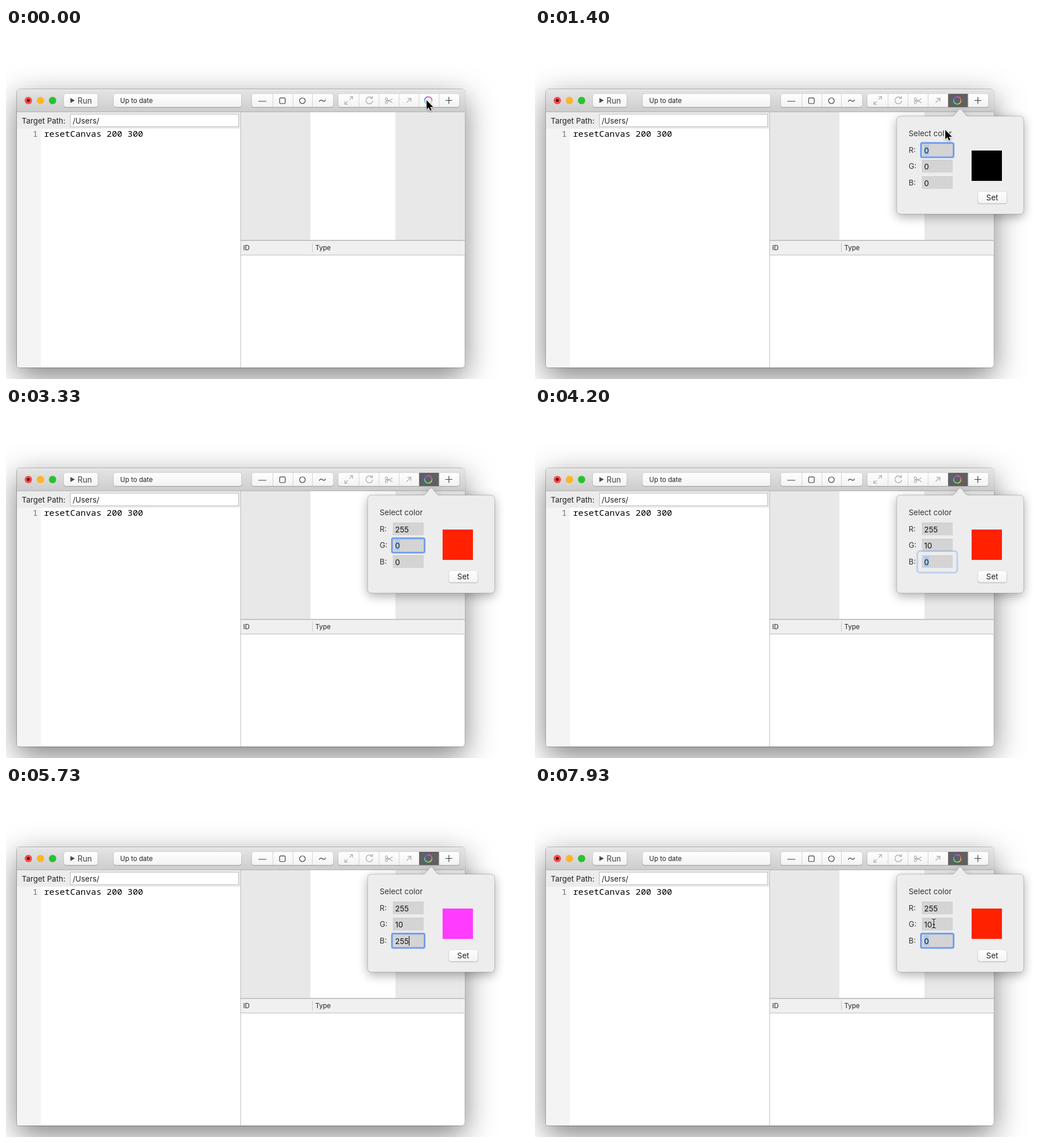
Write an HTML page with a canvas that moves like this. It is 914 px wide and 613 px high and loops after 8 s.

```html
<!DOCTYPE html>
<html lang="en">
<head>
<meta charset="utf-8">
<title>Color picker</title>
<style>
html, body { margin: 0; width: 100%; height: 100%; overflow: hidden; background: #fff; }
canvas { display: block; }
</style>
</head>
<body>
<canvas id="stage" width="914" height="613"></canvas>
<script>
const W = 914, H = 613, LOOP = 8000, FPS = 15;
const SANS = 'Inter, "Liberation Sans", sans-serif';
const MONO = '"Noto Sans Mono", "DejaVu Sans Mono", monospace';
const stage = document.getElementById('stage').getContext('2d');

function makeLayer() {
  const c = document.createElement('canvas');
  c.width = W;
  c.height = H;
  return c.getContext('2d');
}
const base = makeLayer(), layer = makeLayer();

// Shared drawing helpers
function rect(g, x, y, w, h, fill) {
  g.fillStyle = fill;
  g.fillRect(x, y, w, h);
}
function round(g, x, y, w, h, r, fill, stroke, width = 1) {
  g.beginPath();
  g.roundRect(x, y, w, h, r);
  if (fill) { g.fillStyle = fill; g.fill(); }
  if (stroke) { g.strokeStyle = stroke; g.lineWidth = width; g.stroke(); }
}
function disc(g, x, y, r, fill) {
  g.beginPath();
  g.arc(x, y, r, 0, Math.PI * 2);
  g.fillStyle = fill;
  g.fill();
}
function text(g, str, x, y, size, color = '#222', family = SANS, align = 'left') {
  g.font = `${size}px ${family}`;
  g.fillStyle = color;
  g.textAlign = align;
  g.fillText(str, x, y);
}
function line(g, d, color, width = 1.1) {
  g.strokeStyle = color;
  g.lineWidth = width;
  g.stroke(new Path2D(d));
}
function shadow(g, color, blur, dy) {
  g.shadowColor = color;
  g.shadowBlur = blur;
  g.shadowOffsetY = dy;
}
function button(g, x, y, w, h) {
  const fill = g.createLinearGradient(0, y, 0, y + h);
  fill.addColorStop(0, '#fefefe');
  fill.addColorStop(1, '#f3f3f3');
  g.save();
  shadow(g, 'rgba(0,0,0,.28)', 1.5, 0.8);
  round(g, x, y, w, h, 4, fill);
  g.restore();
  round(g, x, y, w, h, 4, null, 'rgba(0,0,0,.1)', 0.6);
}
function colorRing(g) {
  const hue = g.createConicGradient(0, 738, 126.5);
  for (let i = 0; i <= 12; i++) hue.addColorStop(i / 12, `hsl(${i * 30 + 20},75%,62%)`);
  g.beginPath();
  g.arc(738, 126.5, 6.4, 0, Math.PI * 2);
  g.strokeStyle = hue;
  g.lineWidth = 1.7;
  g.stroke();
}

function drawToolbar(g) {
  const bar = g.createLinearGradient(0, 107, 0, 146);
  bar.addColorStop(0, '#e5e5e5');
  bar.addColorStop(1, '#cdcdcd');
  rect(g, 19, 107, 783, 39, bar);
  rect(g, 19, 107, 783, 1, '#efefef');
  rect(g, 19, 146, 783, 1, '#b1b1b1');

  ['#fc4a46', '#fdb42a', '#28c231'].forEach((c, i) => disc(g, 39 + i * 21.2, 126.6, 6.4, c));
  disc(g, 39, 126.6, 2.5, '#4c0505');

  button(g, 101, 115, 59.5, 23);
  button(g, 188, 115, 223.5, 23);
  button(g, 429.5, 115, 142.5, 23);
  button(g, 580.5, 115, 212, 23);
  g.fillStyle = '#4a4a4a';
  g.fill(new Path2D('M112.5 122.3L120.3 126.6L112.5 131Z'));
  text(g, 'Run', 125, 131.6, 13.8, '#444');
  text(g, 'Up to date', 199.5, 131, 11.6);
  for (const x of [466, 501, 535, 616.5, 651.5, 686.5, 721.5, 756.5]) rect(g, x, 115, 1, 23, '#d2d2d2');

  const dark = '#3d3d3d', dim = '#a5a5a5';
  line(g, 'M441 128H455', dark);
  round(g, 478.2, 122.2, 9.8, 9.8, 1.8, null, dark, 1.2);
  line(g, 'M523 127A5 5 0 1 1 513 127A5 5 0 1 1 523 127', dark, 1.2);
  line(g, 'M547.3 128.8C549 124.6 551.2 125.6 553 127S557 129 558.6 125.3', dark, 1.2);
  line(g, 'M592.5 132.8L597.4 127.9M600.2 125.2L605.2 120.2M600.5 119.8H605.6V125M592.2 128V133.2H597.4', dim);
  line(g, 'M639.5 122.4A6 6 0 1 0 641 127.2M640.3 118.7V123H636', dim, 1.2);
  line(g, 'M675.5 123.7L666.6 128.7M675.5 130.7L666.6 125.5M666.7 124.3A1.9 1.9 0 1 1 663 124.3A1.9 1.9 0 1 1 666.7 124.3M666.7 129.9A1.9 1.9 0 1 1 663 129.9A1.9 1.9 0 1 1 666.7 129.9', dim);
  line(g, 'M700 130.4L707.3 123.1M701.6 122.8H707.6V128.8', dim, 1.2);
  colorRing(g);
  line(g, 'M768 126.5H780M774 120.5V132.5', dark, 1.2);
}

function drawWindow(g) {
  rect(g, 0, 0, W, H, '#fff');
  g.save();
  shadow(g, 'rgba(0,0,0,.5)', 52, 16);
  round(g, 19, 107, 782.5, 486, 5, '#fff');
  g.restore();
  round(g, 18.5, 106.5, 783.3, 487, 5.5, null, 'rgba(0,0,0,.24)');

  g.save();
  g.beginPath();
  g.roundRect(19, 107, 782.5, 486, 5);
  g.clip();
  rect(g, 19, 107, 783, 487, '#fff');
  drawToolbar(g);

  rect(g, 19, 147, 391, 29, '#ececec');
  text(g, 'Target Path:', 27.5, 167, 13.4);
  rect(g, 112, 150, 295, 23, '#bcbcbc');
  rect(g, 113, 151, 293, 21, '#fff');
  text(g, '/Users/', 116.5, 167, 13.4);
  rect(g, 19, 176, 42, 418, '#f4f4f4');
  text(g, '1', 46.5, 190, 15.2, '#777', MONO);
  text(g, 'resetCanvas 200 300', 66.5, 190, 15.2, '#000', MONO);

  rect(g, 410, 147, 392, 223, '#e8e8e8');
  rect(g, 532, 147, 148.5, 223, '#fff');
  rect(g, 410, 370, 392, 2, '#c4c4c4');
  rect(g, 410, 372, 392, 24, '#f0f0f0');
  rect(g, 410, 396, 392, 1, '#bdbdbd');
  rect(g, 535, 375, 1, 17, '#c9c9c9');
  text(g, 'ID', 414.5, 387.5, 11.6);
  text(g, 'Type', 540.5, 387.5, 11.6);
  rect(g, 409.5, 147, 1, 447, '#b9b9b9');
  g.restore();
}

// Field edits: time, field index, value, whole value selected
const EDITS = [
  [0, 0, '0', true],
  [1870, 0, '2'], [2070, 0, '25'], [2270, 0, '255'],
  [2670, 1, '0', true], [3470, 1, '1'], [3670, 1, '10'],
  [4130, 2, '0', true], [4870, 2, '4'], [5130, 2, '45'], [5400, 2, '255'],
  [6870, 2, '25'], [7000, 2, '2'], [7130, 2, '0', true]
];
const FIELD_Y = [202, 230.5, 259];

function formAt(t) {
  const form = { values: ['0', '0', '0'], focus: 0, since: 0, edited: 0, selected: true };
  for (const [at, field, value, selected] of EDITS) {
    if (at > t + 4) break;
    if (field !== form.focus) form.since = at;
    form.values[field] = value;
    Object.assign(form, { focus: field, edited: at, selected: !!selected });
  }
  return form;
}

// Interpolates rows of [time, ...numbers]
function track(rows, t) {
  const i = rows.findIndex(r => r[0] > t);
  if (i < 0) return rows[rows.length - 1].slice(1);
  if (i === 0) return rows[0].slice(1);
  const a = rows[i - 1], b = rows[i], k = (t - a[0]) / (b[0] - a[0]);
  return a.slice(1).map((v, n) => v + (b[n + 1] - v) * k);
}

function swatchColor(values) {
  const [r, g, b] = values.map(Number);
  return `rgb(${r},${Math.round(Math.max(g, r * 0.13 + b * 0.1))},${b})`;
}

function drawFocus(g, t, form) {
  const y = FIELD_Y[form.focus];
  const k = form.since ? Math.min(1, (t - form.since) / 260) : 1;
  const grow = 12 * (1 - k) ** 2;
  g.globalAlpha = 0.15 + 0.85 * k;
  round(g, 674.5 - grow, y - 1.2 - grow, 57 + grow * 2, 25 + grow * 2, 2.5 + grow / 3, null, '#719eee', 3);
  g.globalAlpha = 1;
}

function drawPopover(g, t) {
  const form = formAt(t);
  const body = new Path2D('M638 154H729C735 154 739 141.5 743 141.5S751 154 757 154H848A6 6 0 0 1 854 160V319A6 6 0 0 1 848 325H638A6 6 0 0 1 632 319V160A6 6 0 0 1 638 154Z');
  g.save();
  shadow(g, 'rgba(0,0,0,.32)', 18, 5);
  g.fillStyle = '#ededed';
  g.fill(body);
  g.restore();
  g.strokeStyle = 'rgba(0,0,0,.22)';
  g.lineWidth = 0.9;
  g.stroke(body);

  text(g, 'Select color', 653, 189, 13.4, '#333');
  FIELD_Y.forEach((y, i) => {
    const value = form.values[i], active = form.focus === i;
    text(g, 'RGB'[i] + ':', 653, y + 15.7, 13.2, '#333');
    rect(g, 676, y, 54, 22, '#d4d4d4');
    rect(g, 676, y, 54, 1, '#c8c8c8');
    g.font = `13.4px ${SANS}`;
    const end = 680 + g.measureText(value).width;
    if (active && form.selected) rect(g, 680, y + 2, end - 680, 18, '#a8c8ef');
    text(g, value, 680, y + 16.7, 13.4, '#111');
    if (active && !form.selected && (t - form.edited) % 1100 < 600) {
      rect(g, end, y + 3, 1, 17, '#000');
    }
  });
  drawFocus(g, t, form);
  rect(g, 763, 214, 53, 53, swatchColor(form.values));
  button(g, 774, 286, 50.5, 20.5);
  text(g, 'Set', 799, 301, 13.4, '#222', SANS, 'center');
}

const OPENING = [
  [900, 0.7, 0.2], [1000, 0.855, 0.6], [1067, 1.02, 0.95],
  [1133, 1.06, 1], [1200, 1.02, 1], [1267, 0.995, 1], [1333, 1, 1]
];

const VISITS = [
  { until: 1866, path: [[0, 735, 126], [1200, 735, 126], [1333, 723, 164], [1400, 717, 178], [1467, 716, 192], [1533, 717, 205], [1600, 717, 211]] },
  { until: 6866, path: [[6200, 717, 211], [6330, 714, 230], [6530, 711, 254]] },
  { until: LOOP, path: [[7266, 711, 254], [7466, 708, 251], [7800, 697, 240]] }
];

function drawCursor(g, t) {
  const visit = VISITS.find(v => t >= v.path[0][0] && t < v.until);
  if (!visit) return;
  const [x, y] = track(visit.path, t);
  const overField = x > 676 && x < 730 && FIELD_Y.some(f => y > f && y < f + 22);
  g.save();
  g.translate(x, y);
  g.lineJoin = 'round';
  if (overField) {
    const beam = 'M-3.5 -8Q0 -8 0 -6V6Q0 8 -3.5 8M3.5 -8Q0 -8 0 -6M0 6Q0 8 3.5 8M-2 1.8H2';
    line(g, beam, 'rgba(255,255,255,.75)', 3);
    line(g, beam, '#111', 1.2);
  } else {
    const arrow = new Path2D('M0 0V16.3L3.8 12.8L6.3 18.6L8.9 17.5L6.5 11.9H11.7Z');
    g.save();
    shadow(g, 'rgba(0,0,0,.35)', 3, 1);
    g.strokeStyle = '#fff';
    g.lineWidth = 2;
    g.stroke(arrow);
    g.restore();
    g.fillStyle = '#000';
    g.fill(arrow);
  }
  g.restore();
}

function render(t) {
  stage.drawImage(base.canvas, 0, 0);
  if (t >= 800) {
    rect(stage, 722, 115, 34.5, 23, '#606060');
    colorRing(stage);
  }
  if (t >= 930) {
    const [scale, alpha] = track(OPENING, t);
    layer.setTransform(1, 0, 0, 1, 0, 0);
    layer.clearRect(0, 0, W, H);
    layer.translate(743, 140);
    layer.scale(scale, scale);
    layer.translate(-743, -140);
    drawPopover(layer, t);
    stage.globalAlpha = alpha;
    stage.drawImage(layer.canvas, 0, 0);
    stage.globalAlpha = 1;
  }
  drawCursor(stage, t);
}

function tick() {
  const t = performance.now() % LOOP;
  render(Math.floor((t + 4) * FPS / 1000) * 1000 / FPS % LOOP);
  requestAnimationFrame(tick);
}

drawWindow(base);
tick();
</script>
</body>
</html>
```
